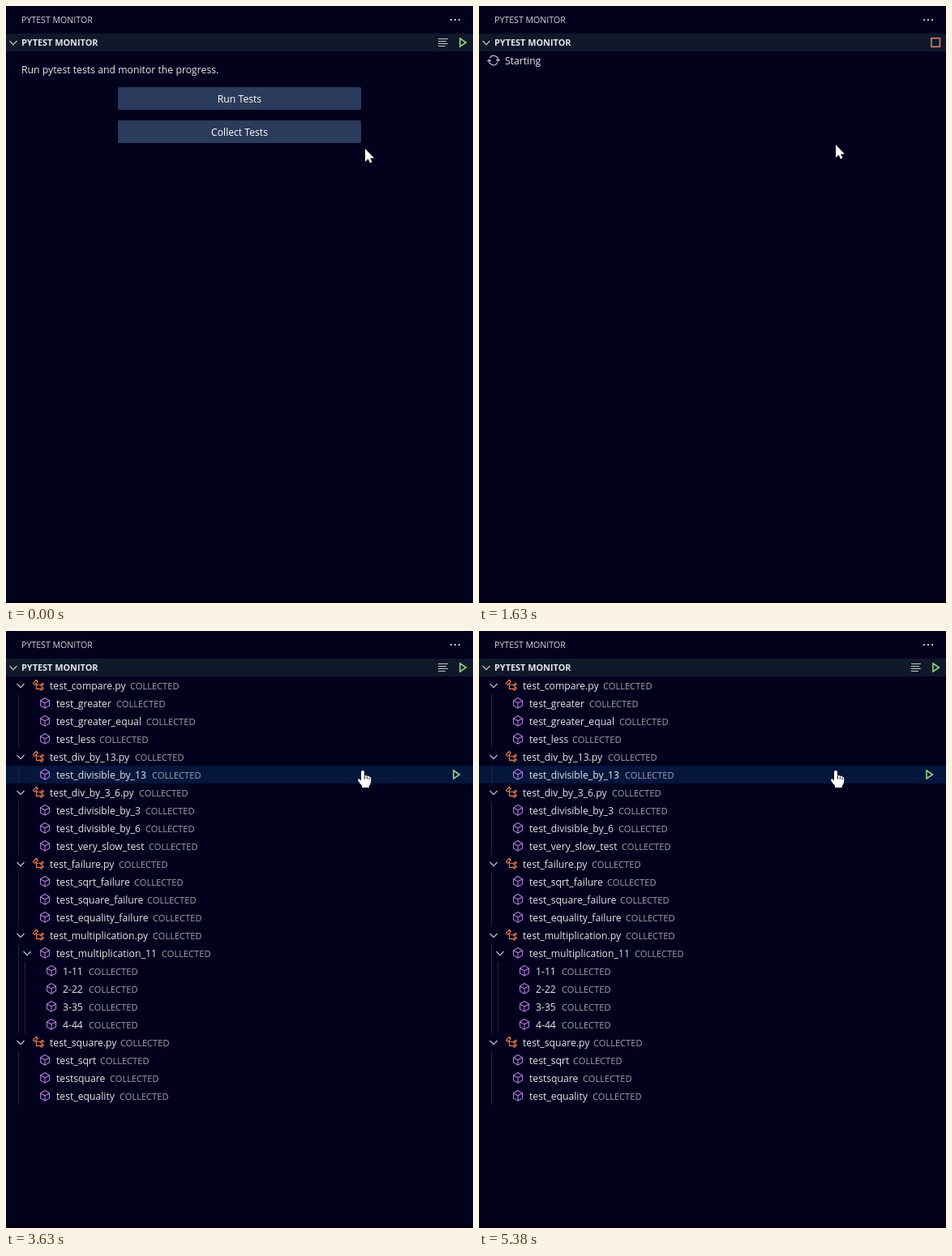
Write an HTML page with a canvas that moves like this. It is 576 by 736 pixels and loops after 5510 ms.

```html
<!DOCTYPE html>
<html lang="en">
<head>
<meta charset="utf-8">
<title>Pytest Monitor</title>
<style>
  html, body { margin: 0; width: 100%; height: 100%; overflow: hidden; background: #03001d; }
  canvas { display: block; }
</style>
</head>
<body>
<canvas id="stage" width="576" height="736"></canvas>
<script>
const ctx = document.getElementById('stage').getContext('2d');
const LOOP = 5510, STEP = 125;
const SPIN_START = 880, TREE_START = 3380, SPIN_PERIOD = 1500;
const HOVER_ROW = 5;
const FONT = '"Open Sans", "Noto Sans", sans-serif';
const COLOR = {
  bg: '#03001d', header: '#0f192a', button: '#2b3b5b', buttonHover: '#364870',
  rowHover: '#04163c', text: '#e6e6ea', title: '#d6d6dc', label: '#a3a2ae',
  icon: '#c8c8ce', guide: '#25243c', green: '#8cd688', red: '#ee7d68',
  file: '#f0804a', test: '#b478dc', spin: '#b9b5c6'
};

// [depth, name, x of the status label]
const ROWS = [
  [0, 'test_compare.py', 153], [1, 'test_greater', 136],
  [1, 'test_greater_equal', 173], [1, 'test_less', 115],
  [0, 'test_div_by_13.py', 159], [1, 'test_divisible_by_13', 180],
  [0, 'test_div_by_3_6.py', 164], [1, 'test_divisible_by_3', 172],
  [1, 'test_divisible_by_6', 172], [1, 'test_very_slow_test', 176],
  [0, 'test_failure.py', 139], [1, 'test_sqrt_failure', 158],
  [1, 'test_square_failure', 174], [1, 'test_equality_failure', 181],
  [0, 'test_multiplication.py', 181], [1, 'test_multiplication_11', 192],
  [2, '1-11', 102], [2, '2-22', 102], [2, '3-35', 102], [2, '4-44', 102],
  [0, 'test_square.py', 141], [1, 'test_sqrt', 116],
  [1, 'testsquare', 128], [1, 'test_equality', 140]
];

const CUBE = new Path2D('M8 1.5L13.5 4.8V11L8 14.2L2.5 11V4.8ZM2.5 5L8 7.8L13.5 5M8 7.8V14');
const CLASS = new Path2D('M1.4 5.4L5.4 1.4L7.3 3.4L3.4 7.3ZM5.4 6V12.4H10.6M5.4 7.3H10.6' +
  'M10.4 8L13 5.4L14.3 6.7L11.7 9.3ZM10.4 13L13 10.4L14.3 11.7L11.7 14.3Z');
const SYNC = new Path2D('M2.5 7.2A5.5 5.5 0 0 0 12.8 10.7M13.5 8.8A5.5 5.5 0 0 0 3.2 5.3' +
  'M.4 9.2L2.5 7.1L4.6 9.2M11.4 6.8L13.5 8.9L15.6 6.8');
const ARROW = new Path2D('M0 0V16L3.7 12.6L6 17.4L8.4 16.4L6.2 11.6H11Z');
const HAND = new Path2D('M-2 1.6Q0 -1 2 1.6V7Q4 5.5 5.3 7.4Q7 6.3 8 8.2Q10 7.6 10.3 10' +
  'L10 15Q9.5 18 8 19V21.5H-1V19Q-3 17 -5.5 13.3Q-6.5 10.4 -4 10.8L-2 12.8Z');
const KNUCKLES = new Path2D('M2.4 7V11M5.3 8V11M8 9V11.4');

function rect(x, y, w, h, color) {
  ctx.fillStyle = color;
  ctx.fillRect(x, y, w, h);
}

function text(str, x, y, size = 12.2, color = COLOR.text, weight = 400, align = 'left') {
  ctx.font = `${weight} ${size}px ${FONT}`;
  ctx.fillStyle = color;
  ctx.textAlign = align;
  ctx.fillText(str, x, y);
}

function line(points, color, width = 1, closed = false) {
  ctx.beginPath();
  points.forEach(([x, y]) => ctx.lineTo(x, y));
  if (closed) ctx.closePath();
  ctx.strokeStyle = color;
  ctx.lineWidth = width;
  ctx.stroke();
}

function icon(path, cx, cy, color, angle = 0, width = 1.1) {
  ctx.save();
  ctx.translate(cx, cy);
  ctx.rotate(angle);
  ctx.translate(-8, -8);
  ctx.strokeStyle = color;
  ctx.lineWidth = width;
  ctx.stroke(path);
  ctx.restore();
}

const chevron = (x, y) => line([[x - 4.5, y - 2], [x, y + 2.7], [x + 4.5, y - 2]], COLOR.icon, 1.1);
const play = (x, y) => line([[x, y - 5], [x + 7.4, y], [x, y + 5]], COLOR.green, 1.6, true);

function cursor(x, y, hand) {
  ctx.save();
  ctx.translate(x, hand ? y + 0.6 : y);
  ctx.fillStyle = '#fff';
  ctx.strokeStyle = '#000';
  ctx.lineWidth = 1;
  const shape = hand ? HAND : ARROW;
  ctx.stroke(shape);
  ctx.fill(shape);
  if (hand) ctx.stroke(KNUCKLES);
  ctx.restore();
}

function drawFrame(running) {
  rect(0, 0, 576, 736, COLOR.bg);
  rect(0, 734, 576, 2, '#01000f');
  text('PYTEST MONITOR', 19, 21, 10.6, COLOR.title);
  for (const x of [548, 553, 558]) rect(x, 16, 2, 2, COLOR.icon);
  rect(0, 34, 576, 22, COLOR.header);
  chevron(9, 45);
  text('PYTEST MONITOR', 19, 49, 10.9, COLOR.text, 700);
  if (running) {
    ctx.strokeStyle = COLOR.red;
    ctx.lineWidth = 1.5;
    ctx.strokeRect(558, 39.7, 10.5, 10.5);
  } else {
    [12, 10, 12, 9].forEach((w, i) => rect(533, 40 + i * 3, w, 1, COLOR.icon));
    play(560, 45);
  }
}

function drawButton(label, y, hover) {
  ctx.fillStyle = hover ? COLOR.buttonHover : COLOR.button;
  ctx.beginPath();
  ctx.roundRect(138, y, 300, 28, 1.5);
  ctx.fill();
  text(label, 288, y + 19, 12.2, '#fff', 400, 'center');
}

function drawWelcome(t) {
  const p = Math.min(1, Math.max(0, (t - 130) / 370));
  const ease = 1 - (1 - p) ** 2;
  const left = t >= 630;
  const x = left ? 440 : 443 - 11 * ease;
  const y = left ? 171 : 176 - 8 * ease;
  const hover = x < 438 && y < 169;
  text('Run pytest tests and monitor the progress.', 19, 83, 12.25);
  drawButton('Run Tests', 100, false);
  drawButton('Collect Tests', 141, hover);
  cursor(Math.round(x), Math.round(y), hover);
}

function drawStarting(t) {
  icon(SYNC, 18, 67, COLOR.spin, (t - SPIN_START) / SPIN_PERIOD * Math.PI * 2, 1.3);
  text('Starting', 32, 72);
  cursor(440, 171, false);
}

function drawTree() {
  ROWS.forEach(([depth, name, labelX], i) => {
    const y = 67 + 22 * i, iconX = 40 + 8 * depth;
    if (i === HOVER_ROW) {
      rect(0, y - 11, 576, 22, COLOR.rowHover);
      play(552, y);
    }
    for (let d = 0; d < depth; d++) rect(15 + 8 * d, y - 11, 1, 22, COLOR.guide);
    const next = ROWS[i + 1];
    if (next && next[0] > depth) chevron(18 + 8 * depth, y);
    icon(depth ? CUBE : CLASS, iconX, y, depth ? COLOR.test : COLOR.file);
    text(name, iconX + 14, y + 5);
    text('COLLECTED', labelX, y + 5, 11.1, COLOR.label);
  });
  cursor(440, 171, true);
}

// The picture holds for each step of 120 or 130 ms.
function heldTime(t) {
  const start = i => Math.round(i * STEP / 10) * 10;
  const i = Math.floor(t / STEP);
  return start(i) > t ? start(i - 1) : start(i);
}

function render(now) {
  const t = heldTime(now % LOOP);
  const running = t >= SPIN_START && t < TREE_START;
  drawFrame(running);
  if (running) drawStarting(t);
  else if (t < SPIN_START) drawWelcome(t);
  else drawTree();
}

let origin;
function tick(now) {
  origin ??= now;
  render(now - origin);
  requestAnimationFrame(tick);
}
render(0);
requestAnimationFrame(tick);
</script>
</body>
</html>
```
